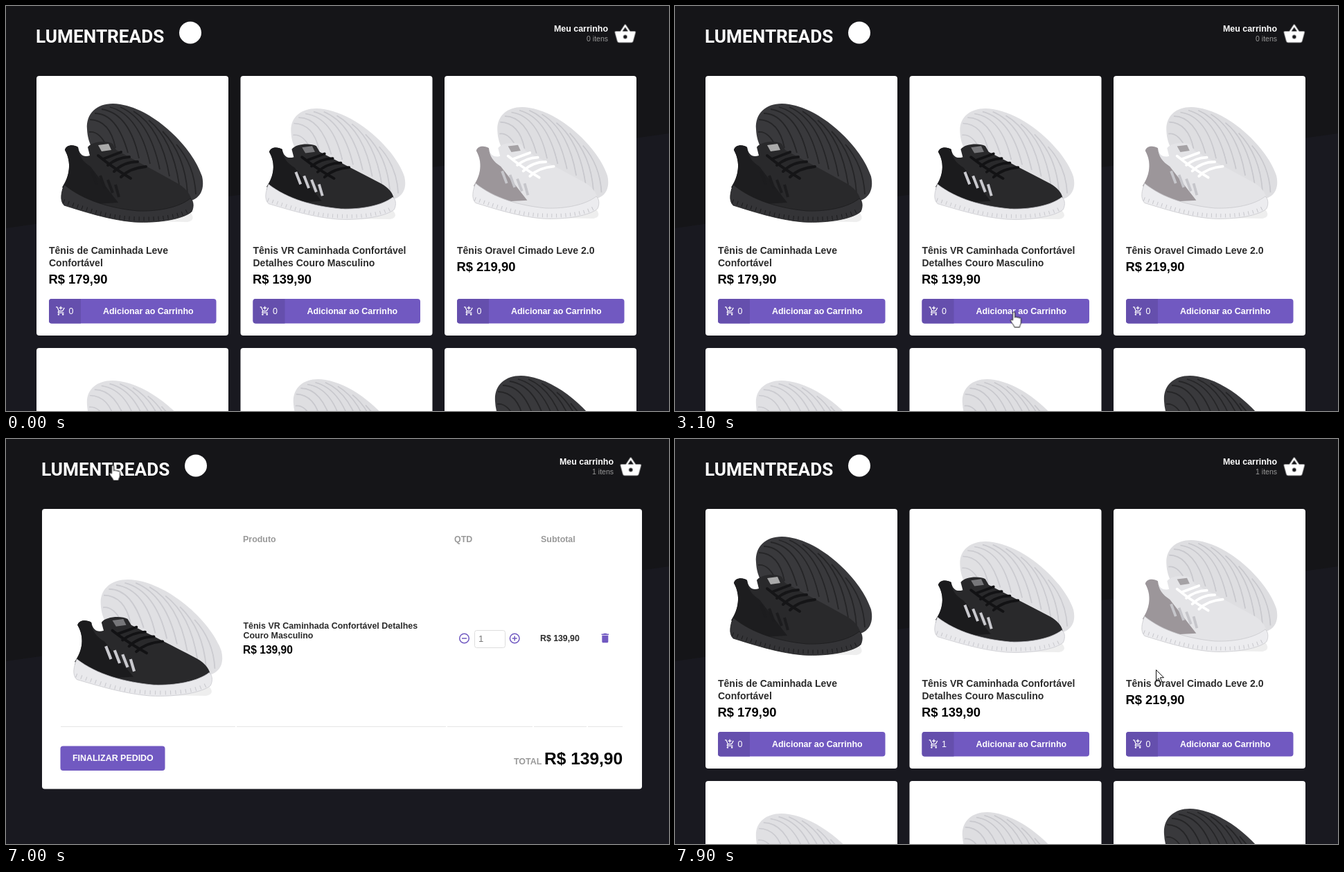
Recreate the animation shown at these times as an HTML page. Size 957x585 px, loop 8000 ms.

```html
<!DOCTYPE html>
<html lang="pt-BR">
<head>
<meta charset="utf-8">
<title>Loja de tênis</title>
<style>
html, body { margin: 0; width: 100%; height: 100%; overflow: hidden; background: #191920; }
svg { display: block; }
text { font: bold 12.45px "Liberation Sans", Arial, sans-serif; fill: #fff; white-space: pre; }
.brand { font: bold 26.2px Roboto, sans-serif; }
.small { font-size: 10.5px; font-weight: normal; fill: #999; }
.name { font-size: 14px; fill: #2b2b2b; }
.price { font-size: 18.4px; fill: #000; }
.dark { fill: #2b2b2b; }
.gray { fill: #999; }
.plain { font-weight: normal; }
.end { text-anchor: end; }
.white { fill: #fff; }
.violet { fill: #7159c1; }
.ring { fill: none; stroke: #7159c1; stroke-width: 1.5; }

.black { --sole: #39393c; --ridge: #252527; --upper: #29292b; --heel: #1d1d1f; --mid: #343437; --edge: #1c1c1e; --lace: #151517; --tag: #aaa; }
.duo { --sole: #e0e0e3; --ridge: #cbcbd0; --upper: #29292b; --heel: #1b1b1d; --mid: #e9e9ec; --edge: #c9c9ce; --lace: #121214; --tag: #77777a; }
.pale { --sole: #dedee1; --ridge: #c8c8cd; --upper: #e4e4e7; --heel: #9c969a; --mid: #ececef; --edge: #c6c6cb; --lace: #fff; --tag: #a5a2a5; }

/* Every track shares one 8 s clock */
.home, .cart, .zero, .one, .head, .arrow, .hand, .bar { animation: 8s step-end infinite; }
.home { animation-name: home; }
.cart { animation-name: cart; }
.zero { animation-name: zero; }
.one { animation-name: one; }
.head { animation-name: head; }
.arrow { animation-name: arrow; }
.hand { animation-name: hand; }
.bar { animation-name: bar; }
.cursor { animation: move 8s infinite; }

@keyframes home { 0%, 93.75%, 100% { opacity: 1 } 47.5% { opacity: 0 } }
@keyframes cart { 0%, 92.5%, 100% { opacity: 0 } 47.5% { opacity: 1 } }
@keyframes zero { 0% { opacity: 1 } 47.5%, 100% { opacity: 0 } }
@keyframes one { 0% { opacity: 0 } 47.5%, 100% { opacity: 1 } }
@keyframes head { 0%, 93.75%, 100% { transform: none } 47.5% { transform: translateX(8px) } }
@keyframes arrow {
  0%, 28.75%, 47.5%, 73.75%, 93.75%, 100% { opacity: 1 }
  25%, 30%, 61.25%, 83.75% { opacity: 0 }
}
@keyframes hand {
  0%, 47.5%, 62.5%, 73.75%, 93.75%, 100% { opacity: 0 }
  30%, 61.25%, 66.25%, 83.75% { opacity: 1 }
}
@keyframes bar {
  0%, 28.75%, 66.25%, 100% { opacity: 0 }
  25%, 62.5% { opacity: 1 }
}
@keyframes move {
  0% { transform: translate(23px, -25px); animation-timing-function: steps(9) }
  11.25% { transform: translate(460px, 207px) }
  13.75% { transform: translate(460px, 207px); animation-timing-function: steps(8) }
  23.75% { transform: translate(459px, 338px); animation-timing-function: steps(1) }
  25% { transform: translate(459px, 351px); animation-timing-function: steps(1) }
  26.25% { transform: translate(459px, 386px); animation-timing-function: steps(4) }
  31.25% { transform: translate(474px, 440px) }
  32.5% { transform: translate(474px, 440px); animation-timing-function: steps(2) }
  35% { transform: translate(483px, 440px) }
  36.25% { transform: translate(483px, 440px); animation-timing-function: steps(2) }
  38.75% { transform: translate(489px, 442px) }
  50% { transform: translate(489px, 442px); animation-timing-function: steps(1) }
  51.25% { transform: translate(476px, 446px); animation-timing-function: steps(8) }
  61.25% { transform: translate(656px, 290px); animation-timing-function: steps(4) }
  66.25% { transform: translate(736px, 291px); animation-timing-function: steps(2) }
  68.75% { transform: translate(737px, 291px) }
  70% { transform: translate(737px, 291px); animation-timing-function: steps(1) }
  71.25% { transform: translate(738px, 292px) }
  72.5% { transform: translate(738px, 292px); animation-timing-function: steps(5) }
  78.75% { transform: translate(389px, 140px) }
  80% { transform: translate(389px, 140px); animation-timing-function: steps(4) }
  85% { transform: translate(152px, 27px); animation-timing-function: steps(2) }
  87.5% { transform: translate(154px, 38px) }
  92.5% { transform: translate(154px, 38px); animation-timing-function: steps(5) }
  98.75%, 100% { transform: translate(694px, 333px) }
}
</style>
</head>
<body>
<svg width="957" height="585" viewBox="0 0 957 585">
  <defs>
    <clipPath id="soleClip"><use href="#soleShape"/></clipPath>
    <path id="soleShape" d="M117 178C115 152 136 137 165 142C215 150 270 205 283 246C288 268 278 284 252 283L150 240C128 215 118 200 117 178Z"/>
    <g id="shoe">
      <path d="M80 284Q130 303 185 311L262 312Q275 309 266 298Z" fill="#0001"/>
      <use href="#soleShape" style="fill:var(--sole)"/>
      <path clip-path="url(#soleClip)" style="stroke:var(--ridge)" fill="none" stroke-width="1.8"
        d="M121 164Q150 165 158 205M128 155Q160 155 176 212M138 149Q178 155 192 220M150 146Q192 157 208 228M165 146Q207 164 222 236M184 152Q224 176 236 246M206 165Q240 192 250 258M226 181Q258 214 262 270M246 200Q272 230 274 272M120 182Q135 180 146 204"/>
      <path style="fill:var(--upper)" d="M85 208C87 200 98 200 104 204C106 215 112 219 121 216L118 204C124 195 146 194 154 199L159 208C185 222 215 238 249 257C264 266 270 278 267 288C240 304 175 304 130 293L81 266C92 245 95 226 85 208Z"/>
      <path style="fill:var(--heel)" d="M85 208C87 200 98 200 104 204C105 217 111 225 122 232L162 284L128 286L81 262C92 245 95 226 85 208Z"/>
      <path style="fill:var(--mid);stroke:var(--edge)" stroke-width=".8" d="M84 258C80 268 77 281 84 288C110 296 148 309 185 312C222 314 257 307 268 297C272 289 270 280 266 278C250 291 220 297 190 296C150 292 112 281 84 258Z"/>
      <path style="stroke:var(--edge)" fill="none" stroke-width="6" stroke-dasharray="1 6" d="M83 282C120 295 150 306 186 307C222 309 250 304 266 294"/>
      <path style="stroke:var(--lace)" fill="none" stroke-width="4" stroke-linecap="round"
        d="M140 221L166 211M147 230Q160 219 178 218M156 239Q170 225 190 225M166 247Q179 234 202 232M133 216Q152 232 180 249"/>
      <path style="stroke:var(--edge)" fill="none" stroke-width="4" d="M124 239L131 258M136 245L143 264M147 251L154 270M158 258L163 276"/>
      <path style="fill:var(--tag)" d="M133 201L148 199L152 208L138 210Z"/>
    </g>
    <path id="addCart" class="white" d="M11 9h2V6h3V4h-3V1h-2v3H8v2h3v3zm-4 9a2 2 0 100 4 2 2 0 000-4zm10 0a2 2 0 100 4 2 2 0 000-4zm-9.8-3.2l.9-1.8h7.4c.8 0 1.4-.4 1.8-1l3.8-7L19.4 4l-3.9 7h-7L4.3 2H1v2h2l3.6 7.6-1.4 2.4c-.7 1.400.3 3 1.800 3h12v-2H7.400z"/>
  </defs>

  <rect width="957" height="585" fill="#191920"/>
  <path d="M0 0H957V184L0 321Z" fill="#151518"/>

  <g class="head">
    <text class="brand" x="43" y="53">LUMENTREADS</text>
    <circle class="white" cx="266" cy="38.500" r="16"/>
    <text class="end" x="869" y="37">Meu carrinho</text>
    <text class="small end zero" x="869" y="51">0 itens</text>
    <text class="small end one" x="869" y="51">1 itens</text>
    <path class="white" fill-rule="evenodd" transform="translate(877.500 24.200) scale(1.36)"
      d="M17.200 9l-4.400-6.560a1 1 0 00-1.660 0L6.800 9H2a1 1 0 00-1 1.270l2.580 9.270c.23.840 1 1.460 1.920 1.460h13c.92 0 1.690-.62 1.930-1.460L23 10.270A1 1 0 0022 9zM9 9l3-4.400L15 9zm3 8a2 2 0 110-4 2 2 0 010 4z"/>
  </g>

  <g class="home" id="home"></g>

  <g class="cart">
    <rect class="white" x="52" y="101" width="866" height="404.500" rx="4"/>
    <text class="gray" x="342" y="149">Produto</text>
    <text class="gray" x="647" y="149">QTD</text>
    <text class="gray" x="772" y="149">Subtotal</text>
    <g id="item"></g>
    <text class="dark" x="342.500" y="274">Tênis VR Caminhada Confortável Detalhes</text>
    <text class="dark" x="342.500" y="288">Couro Masculino</text>
    <text class="price" x="342" y="310" style="font-size:15.600px">R$ 139,90</text>
    <circle class="ring" cx="661.500" cy="288" r="6.800"/>
    <path class="ring" d="M658 288h7"/>
    <rect x="676.500" y="276.500" width="44" height="25" rx="3" fill="#fff" stroke="#ddd"/>
    <text class="plain" x="682" y="293" style="font-size:13px;fill:#777">1</text>
    <circle class="ring" cx="734.200" cy="288" r="6.800"/>
    <path class="ring" d="M730.700 288h7m-3.500-3.500v7"/>
    <text class="dark" x="771" y="292" style="font-size:12.300px">R$ 139,90</text>
    <path class="violet" transform="translate(855.800 278.500) scale(.75)" d="M6 19c0 1.100.9 2 2 2h8c1.100 0 2-.9 2-2V7H6zM19 4h-3.500l-1-1h-5l-1 1H5v2h14z"/>
    <path d="M79 415.500H331m2 0H635m2 0H760m2 0H838m2 0H890" stroke="#e6e6e6"/>
    <rect class="violet" x="78.500" y="443.500" width="151" height="35.500" rx="4"/>
    <text x="96" y="465">FINALIZAR PEDIDO</text>
    <text class="gray" x="733" y="470">TOTAL</text>
    <text class="price" x="777" y="470" style="font-size:24.500px">R$ 139,90</text>
  </g>

  <g class="cursor">
    <path class="arrow" fill="#fff" stroke="#111" d="M.5.5V16L4 12.700L6.600 18.500L8.900 17.500L6.400 11.700H11.500Z"/>
    <path class="hand" fill="#fff" stroke="#111" transform="translate(-5.500 -.5)"
      d="M4 12.500V2a1.600 1.600 0 013.200 0V8.500C7.200 7 10.200 7 10.200 8.800C10.200 7.600 13.200 7.600 13.200 9.300C13.200 8.300 16 8.500 16 10.300V15.500C16 18.500 14 19.500 14 22.500H6.500C6 19.500 1.500 15.500.8 13C.5 11.500 2.800 11 4 12.500Z"/>
    <path class="bar" d="M.5-8V8" stroke="#e9e9e9"/>
  </g>
</svg>
<script>
// Bounding box of each shoe, relative to its card
const fits = { black: [36, 40, 205, 172], duo: [36.5, 47, 202, 161], pale: [41, 45, 196, 162] };

const shoe = (kind, [x, y, w, h]) =>
  `<use href="#shoe" class="${kind}" transform="translate(${x} ${y}) scale(${w / 205} ${h / 172}) translate(-80 -141)"/>`;

const cards = [
  ['black', ['Tênis de Caminhada Leve', 'Confortável'], '179,90'],
  ['duo', ['Tênis VR Caminhada Confortável', 'Detalhes Couro Masculino'], '139,90'],
  ['pale', ['Tênis Oravel Cimado Leve 2.0'], '219,90'],
  ['duo'], ['pale'], ['black']
];

const count = (value, cls = '') => `<text class="plain ${cls}" x="46.500" y="343.500">${value}</text>`;

const details = (lines, price, changes) => `
  ${lines.map((line, i) => `<text class="name" x="18" y="${257 + 18 * i}">${line}</text>`).join('')}
  <text class="price" x="17.500" y="${264 + 18 * lines.length}">R$ ${price}</text>
  <rect class="violet" x="18" y="322" width="241.500" height="35.500" rx="4"/>
  <path d="M64 322H22q-4 0-4 4v27.500q0 4 4 4H64z" fill="#654fad"/>
  <use href="#addCart" transform="translate(27.500 332) scale(.63)"/>
  ${changes ? count(0, 'zero') + count(1, 'one') : count(0)}
  <text x="96" y="343.500">Adicionar ao Carrinho</text>`;

document.getElementById('home').innerHTML = cards.map(([kind, lines, price], i) => `
  <g transform="translate(${44 + 294.5 * (i % 3)} ${i < 3 ? 101 : 494})">
    <rect class="white" width="277" height="375" rx="4"/>
    ${shoe(kind, fits[kind])}
    ${lines ? details(lines, price, i === 1) : ''}
  </g>`).join('');

document.getElementById('item').innerHTML = shoe('duo', [98, 203, 215, 169]);
</script>
</body>
</html>
```
